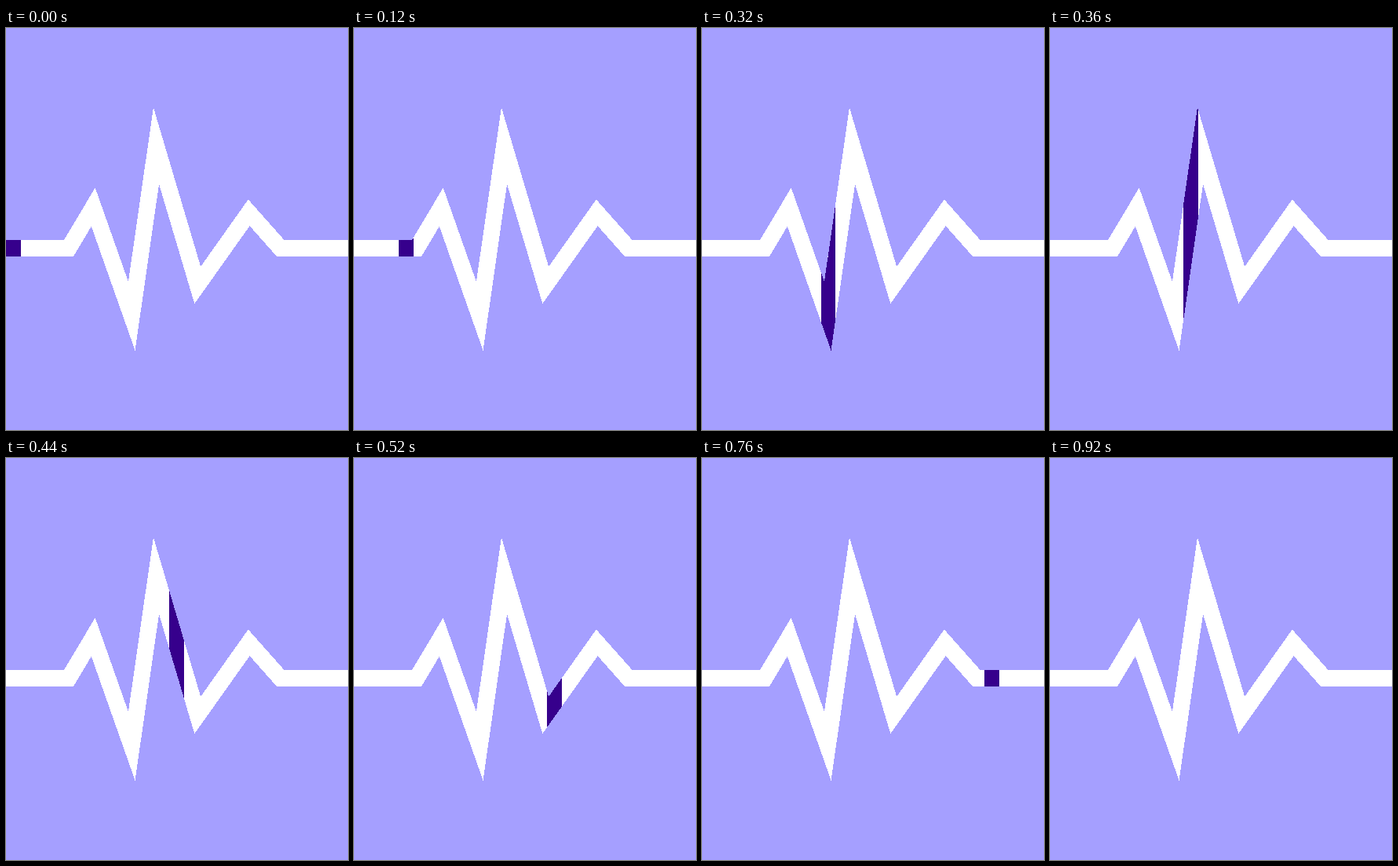
An HTML page that plays this animation: 436 by 512 pixels, repeating every 960 ms.

```html
<!DOCTYPE html>
<html lang="en">
<head>
<meta charset="utf-8">
<title>Pulse</title>
<style>
  html, body { margin: 0; width: 100%; height: 100%; overflow: hidden; background: #a59fff; }
  svg { display: block; }
  use { fill: none; stroke-width: 21; stroke-miterlimit: 10; shape-rendering: crispEdges; }
</style>
</head>
<body>
<svg width="436" height="512" viewBox="0 0 436 512">
  <defs>
    <path id="pulse" d="M-20 280.5H80L111.25 228L160.25 367L191.5 150L244.25 327.5L309.75 235.25L350 280.5H456"/>
    <clipPath id="band"><rect id="window" y="0" height="512"/></clipPath>
  </defs>
  <use href="#pulse" stroke="#fff"/>
  <g clip-path="url(#band)"><use href="#pulse" stroke="#36008c"/></g>
</svg>
<script>
const STEP_MS = 40, STEPS = 24, STEP_PX = 18.94;
const band = document.getElementById('window');
const edge = step => Math.round(step * STEP_PX);

// The dark band crosses the stage in equal steps and is off stage in the last one.
function draw(time) {
  const step = Math.floor(time / STEP_MS) % STEPS;
  band.setAttribute('x', edge(step));
  band.setAttribute('width', edge(step + 1) - edge(step));
}

const start = performance.now();
function tick() {
  draw(performance.now() - start);
  requestAnimationFrame(tick);
}
tick();
</script>
</body>
</html>
```
